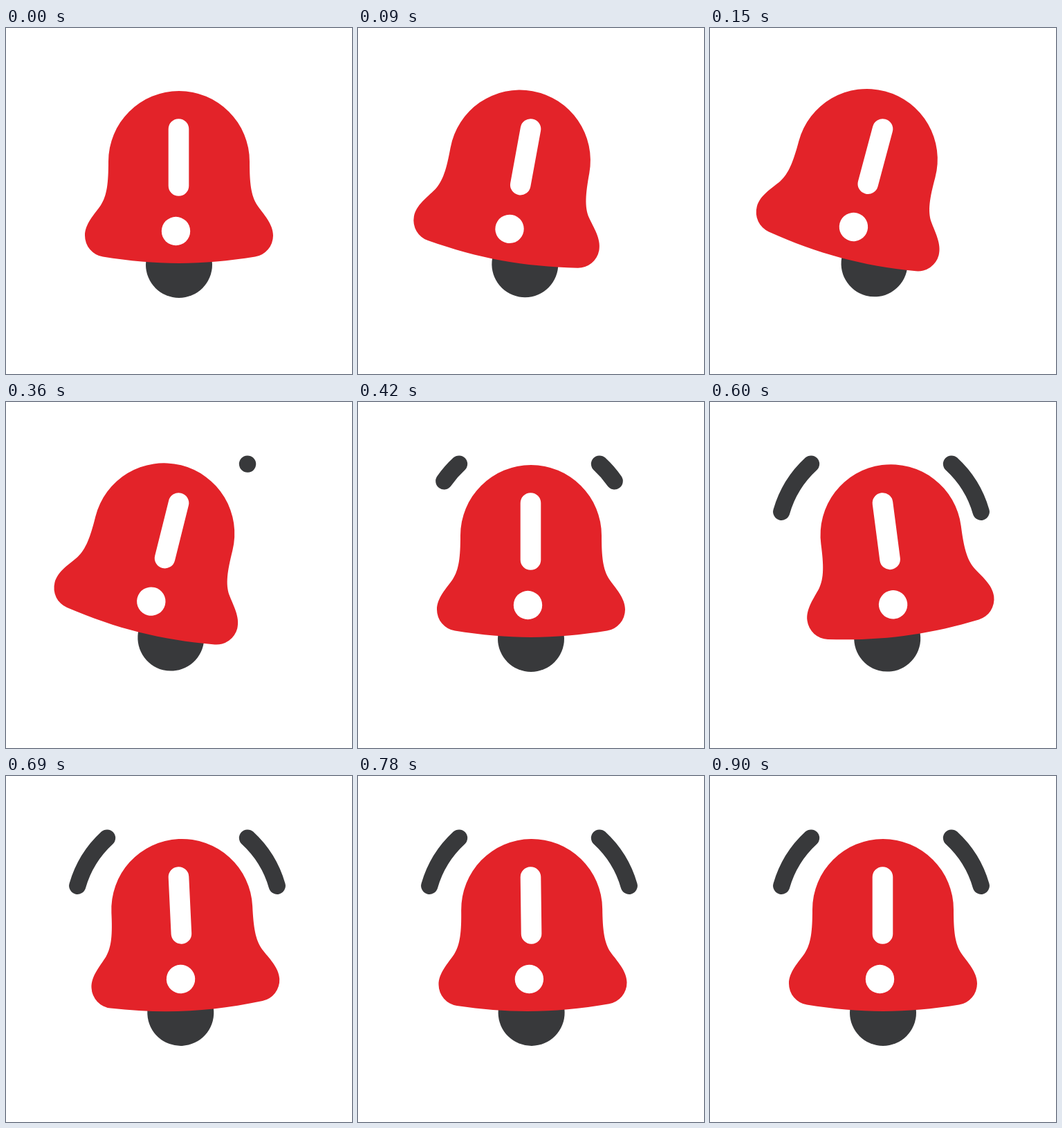
Recreate the animation shown at these times as an HTML page with a canvas. Size 500 px wide and 500 px high, loop 1050 ms.

```html
<!DOCTYPE html>
<html lang="en">
<head>
<meta charset="utf-8">
<title>Ringing alert bell</title>
<style>
html, body { margin: 0; width: 100%; height: 100%; overflow: hidden; background: #fff; }
canvas { display: block; width: 500px; height: 500px; }
</style>
</head>
<body>
<canvas id="stage" width="500" height="500"></canvas>
<script>
const ctx = document.getElementById('stage').getContext('2d');
const RED = '#e32329', DARK = '#38393b', WHITE = '#fff';
const LOOP = 1050, STEP = 30;
const RAD = Math.PI / 180;

const bell = new Path2D(
  'M148 193 A102 102 0 0 1 352 193 C352 224 354 242 363 256 C372 269 386 283 386 300 ' +
  'A31 31 0 0 1 360 330.6 C283 343 217 343 140 330.6 A31 31 0 0 1 114 300 ' +
  'C114 283 128 269 137 256 C146 242 148 224 148 193 Z');

// Cubic Bezier easing with horizontal end tangents.
function ease(x1, x2) {
  return u => {
    if (u <= 0) return 0;
    if (u >= 1) return 1;
    let lo = 0, hi = 1, t;
    for (let i = 0; i < 30; i++) {
      t = (lo + hi) / 2;
      const s = 1 - t;
      const x = 3 * s * s * t * x1 + 3 * s * t * t * x2 + t * t * t;
      if (x < u) lo = t; else hi = t;
    }
    return t * t * (3 - 2 * t);
  };
}

// Each swing: start, end (ms), angle from, angle to (degrees), easing.
const swings = [
  [0, 150, 0, 15, ease(0.5, 0.5)],
  [330, 510, 15, -15, ease(0.6, 0.4)],
  [510, 900, -15, 0, ease(0.16, 0.116)]
];

function angleAt(ms) {
  let angle = 0;
  for (const [start, end, from, to, curve] of swings) {
    if (ms >= start) angle = from + (to - from) * curve((ms - start) / (end - start));
  }
  return angle * RAD;
}

function swing(px, py, angle, draw) {
  ctx.save();
  ctx.translate(px, py);
  ctx.rotate(angle);
  ctx.translate(-px, -py);
  draw();
  ctx.restore();
}

function disc(x, y, r, color) {
  ctx.fillStyle = color;
  ctx.beginPath();
  ctx.arc(x, y, r, 0, Math.PI * 2);
  ctx.fill();
}

function stroke(color, width) {
  ctx.strokeStyle = color;
  ctx.lineWidth = width;
  ctx.lineCap = 'round';
  ctx.stroke();
}

function drawWaves(ms) {
  if (ms < 360) return;
  const grown = Math.min(1, (ms - 360) / 150);
  // A small minimum length keeps the round caps visible.
  const sweep = Math.max(0.02, 31.4 * grown) * RAD;
  const left = 227.4 * RAD, right = -47.4 * RAD;
  ctx.beginPath();
  ctx.arc(247.5, 200, 150, left, left - sweep, true);
  stroke(DARK, 24.4);
  ctx.beginPath();
  ctx.arc(247.5, 200, 150, right, right + sweep);
  stroke(DARK, 24.4);
}

function draw(ms) {
  const angle = angleAt(ms);
  ctx.fillStyle = WHITE;
  ctx.fillRect(0, 0, 500, 500);
  drawWaves(ms);
  swing(250, 294, angle, () => disc(250, 342, 48, DARK));
  swing(250, 103.5, angle, () => {
    ctx.fillStyle = RED;
    ctx.fill(bell);
  });
  swing(249.5, 146, angle, () => {
    ctx.beginPath();
    ctx.moveTo(249.5, 146);
    ctx.lineTo(249.5, 228);
    stroke(WHITE, 29.6);
    disc(245.5, 293.5, 20.7, WHITE);
  });
}

const origin = performance.now();
function tick() {
  const ms = (performance.now() - origin) % LOOP;
  draw(Math.floor(ms / STEP) * STEP);
  requestAnimationFrame(tick);
}
tick();
</script>
</body>
</html>
```
